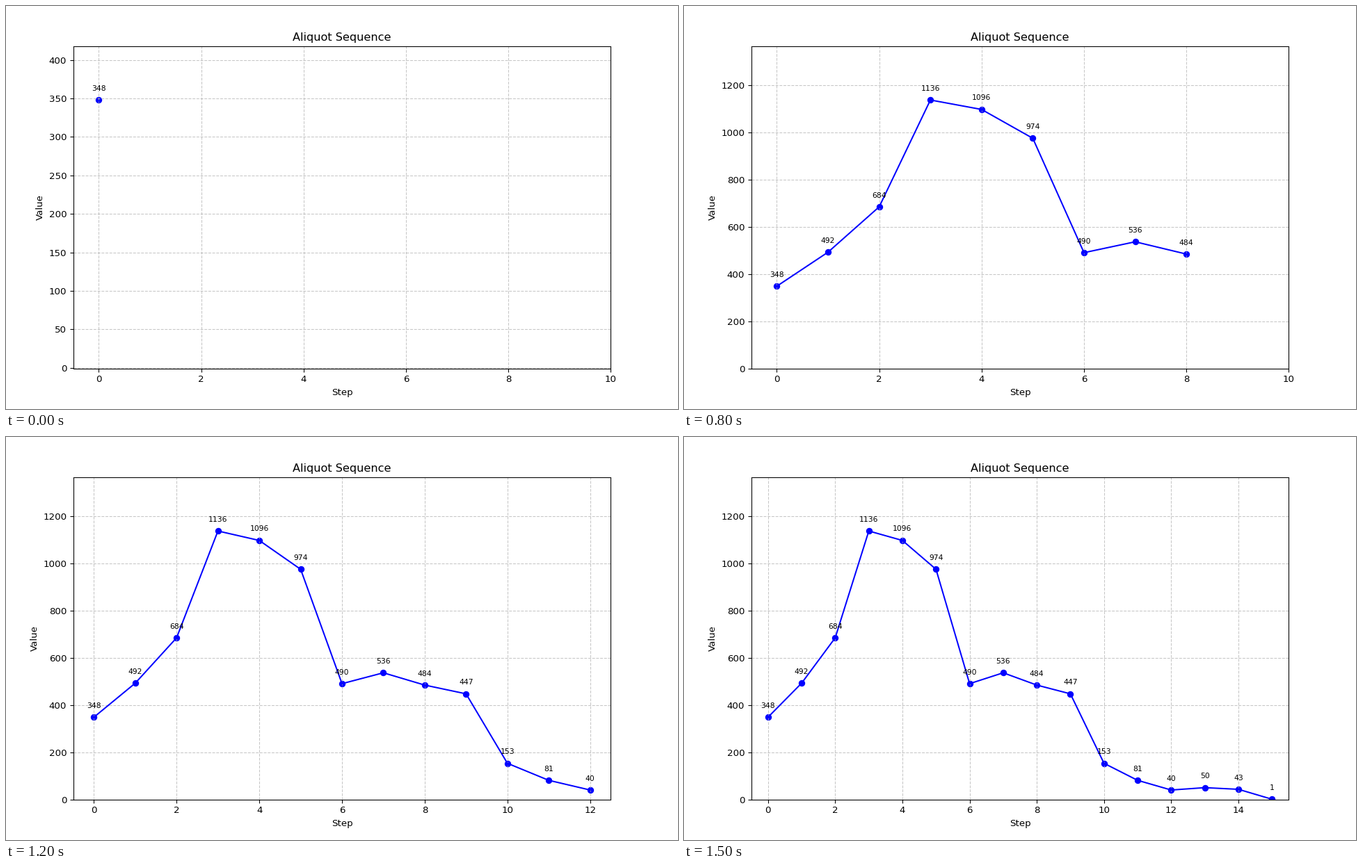
Recreate the animation shown at these times as a matplotlib script. Size 966x580 px, loop 1.6 s.

```python
import matplotlib.pyplot as plt
import numpy as np
from matplotlib.animation import FuncAnimation

WIDTH, HEIGHT, DPI = 966, 580, 96.6
START = 348
INTERVAL = 100


def divisor_sum(n):
    """Sum of the proper divisors of n."""
    return sum(d for d in range(1, n // 2 + 1) if n % d == 0)


def aliquot(n):
    seq = [n]
    while seq[-1] > 1:
        seq.append(divisor_sum(seq[-1]))
    return seq


values = aliquot(START)
points = np.column_stack([np.arange(len(values)), values])

fig = plt.figure(figsize=(WIDTH / DPI, HEIGHT / DPI), dpi=DPI)
ax = fig.add_axes([0.1, 0.1, 0.8, 0.8])
ax.set_title("Aliquot Sequence")
ax.set_xlabel("Step")
ax.set_ylabel("Value")
ax.grid(True, linestyle="--", alpha=0.7)

line, = ax.plot([], [], "b-")
# Scatter sits below the grid, so grid lines cross the dots.
dots = ax.scatter([], [], color="blue")
labels = [
    ax.annotate(str(v), (i, v), xytext=(0, 10), textcoords="offset points",
                ha="center", fontsize=8, visible=False)
    for i, v in enumerate(values)
]


def update(step):
    shown = points[:step + 1]
    line.set_data(shown[:, 0], shown[:, 1])
    dots.set_offsets(shown)
    for i, label in enumerate(labels):
        label.set_visible(i <= step)
    ax.set_xlim(-0.5, max(10, step + 0.5))
    ax.set_ylim(-1, shown[:, 1].max() * 1.2)
    return [line, dots, *labels]


anim = FuncAnimation(fig, update, frames=len(values), init_func=lambda: update(0),
                     interval=INTERVAL, repeat=True, repeat_delay=0, blit=False)
plt.show()
```
